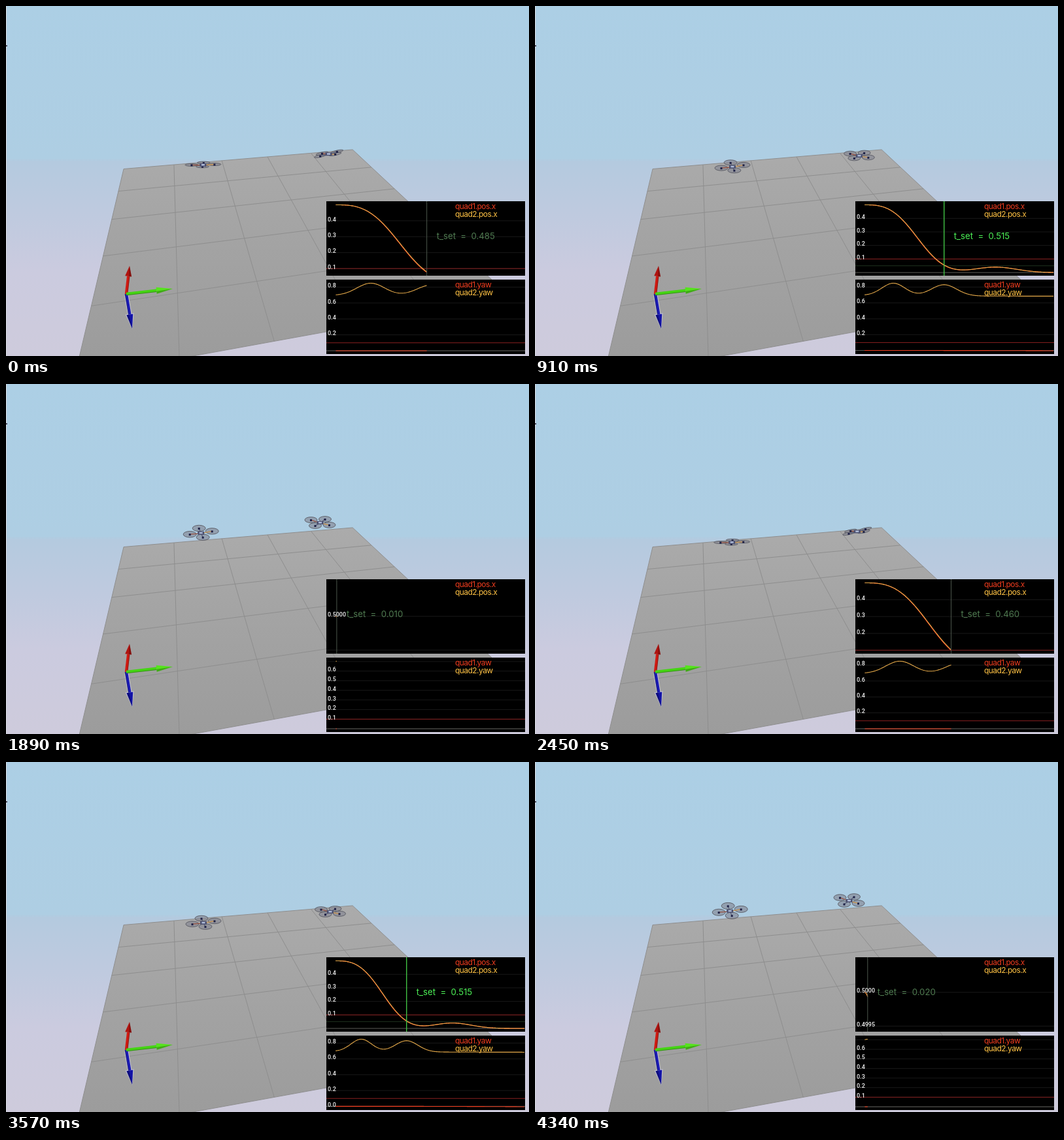
An HTML page with a canvas for the animation above (4.41 s loop, 800 by 536 pixels).

```html
<!DOCTYPE html>
<html lang="en">
<head>
<meta charset="utf-8">
<title>Two quadcopters</title>
<style>
html, body { margin: 0; width: 100%; height: 100%; overflow: hidden; background: #abcfe5; }
canvas { display: block; }
</style>
</head>
<body>
<canvas id="stage" width="800" height="536"></canvas>
<script>
const ctx = document.getElementById('stage').getContext('2d');
const STEP = 70, FRAMES = 63, RATE = .0563, SETTLE = .515;
const RED = '#ee3c1e', AMBER = '#ffc244', TRACE = '#e6aa4a';

const clamp = x => Math.max(0, Math.min(1, x));
const bell = (t, mid, width) => Math.exp(-(((t - mid) / width) ** 2));

// Simulated seconds: joins mid-flight, then restarts twice
function simTime(n) {
  const [first, t0] = n < 27 ? [0, .485] : n < 62 ? [27, .01] : [62, .02];
  return t0 + RATE * (n - first);
}

// Smooth approach to zero with one late rebound
const approach = c => t => .5 * Math.exp(-(t ** 3) / c) + .04 * bell(t, .845, .19);
const pos1 = approach(.06), pos2 = approach(.0615);
const yaw1 = t => -.0021 * t ** 3;
const yaw2 = t => .683 + .012 * Math.exp(-1.5 * t)
  + .157 * bell(t, .19, .105) + .141 * bell(t, .515, .115);

// Visible rotor height follows the acceleration
function tilt(t) {
  const h = .01, a = (pos2(t + h) - 2 * pos2(t) + pos2(t - h)) / (h * h);
  return 4.5 - 2.5 * Math.tanh(a / 3);
}

function line(x0, y0, x1, y1, color, width = 1) {
  ctx.strokeStyle = color;
  ctx.lineWidth = width;
  ctx.beginPath();
  ctx.moveTo(x0, y0);
  ctx.lineTo(x1, y1);
  ctx.stroke();
}

function polygon(points, fill) {
  ctx.fillStyle = fill;
  ctx.beginPath();
  points.forEach(p => ctx.lineTo(...p));
  ctx.closePath();
  ctx.fill();
}

function text(str, x, y, font, color, spacing = 0) {
  ctx.font = font;
  ctx.letterSpacing = spacing + 'px';
  ctx.fillStyle = color;
  ctx.fillText(str, x, y);
}

function gradient(y0, y1, stops) {
  const g = ctx.createLinearGradient(0, y0, 0, y1);
  stops.forEach(([k, c]) => g.addColorStop(k, c));
  return g;
}

// Perspective of the unit floor square
function floorPoint(u, v) {
  const w = 1 + .126 * u - .522 * v;
  return [(180 + 417 * u - 130 * v) / w, (249.5 - 1.8 * u + 22.5 * v) / w];
}

function arrow(dx, dy, head, shaft, tip, halo) {
  const len = Math.hypot(dx, dy), neck = len - head;
  ctx.save();
  ctx.translate(184, 441);
  ctx.rotate(Math.atan2(dy, dx));
  if (halo) {
    line(2, 0, neck, 0, halo, 6.5);
    polygon([[len + 1, 0], [neck - 1, -6.5], [neck - 1, 6.5]], halo);
  }
  line(0, 0, neck, 0, shaft, 4.4);
  line(0, 1.8, neck, 1.8, 'rgba(0,0,0,.3)', 1);
  polygon([[len, 0], [neck, -5], [neck, 5]], tip);
  polygon([[len, 0], [neck, 1], [neck, 5]], 'rgba(0,0,0,.25)');
  ctx.restore();
}

function scene() {
  ctx.fillStyle = gradient(0, 536, [[0, '#accfe5'], [.435, '#aecee3'], [.445, '#b4cadf'],
    [.6, '#bfcadf'], [.76, '#cbcbdf'], [1, '#cecbdc']]);
  ctx.fillRect(0, 0, 800, 536);
  polygon([floorPoint(0, 0), floorPoint(1, 0), floorPoint(1, 1), floorPoint(0, 1)],
    gradient(220, 536, [[0, '#ababab'], [.4, '#a4a4a4'], [1, '#9c9c9c']]));
  for (let i = 0; i <= 5; i++) {
    const k = i / 5;
    line(...floorPoint(k, 0), ...floorPoint(k, 1), '#8e8e8e');
    line(...floorPoint(0, k), ...floorPoint(1, k), '#8e8e8e');
  }
  line(.5, 0, .5, 536, '#d8dbe2');
  ctx.fillStyle = '#445';
  ctx.fillRect(0, 60, 2, 2);
  arrow(9, 53, 22, '#1a1ab4', '#1212a6', 'rgba(215,215,235,.65)');
  arrow(5, -43, 16, '#cf1a12', '#b01410');
  arrow(71, -8, 25, '#45d414', '#55e41c');
}

function drone(cx, cy, p, q, rx, ry, lean) {
  const hubs = [[-p[0], -p[1]], [-q[0], -q[1]], [p[0], p[1]], [q[0], q[1]]];
  const arms = ['#96503f', '#5b6078', '#c8924e', '#5b6078'];
  ctx.save();
  ctx.translate(cx, cy);
  for (const [x, y] of hubs) {
    ctx.beginPath();
    ctx.ellipse(x, y, rx, ry, lean, 0, 2 * Math.PI);
    ctx.fillStyle = 'rgba(130,132,146,.62)';
    ctx.fill();
    ctx.strokeStyle = '#585a62';
    ctx.lineWidth = .9;
    ctx.stroke();
  }
  hubs.forEach(([x, y], i) => {
    line(0, 1, x, y, arms[i], 1.3);
    ctx.fillStyle = '#1e2146';
    ctx.fillRect(x - 1.5, y - 1, 3, 3);
  });
  ctx.fillStyle = '#4b5070';
  ctx.fillRect(-5, -2, 10, 5);
  ctx.fillStyle = '#aebbd8';
  ctx.fillRect(-2.5, -1, 5, 2.5);
  ctx.restore();
}

function drones(t) {
  const s = 1 - pos2(t) / .5, r = tilt(t), m = clamp((4.3 - r) / 2.3);
  drone(480.5 + 15.5 * s, 212 + 17 * s,
    [14 - 4 * m, 1.4 * r - 3 + .7 * m], [-7.5 - 5.5 * m, 1.5 * r - 2.4 + 2.8 * m],
    9.5, r * .9, -.22 * m);
  drone(298.2 + 3.8 * s, 227.8 + 18 * s,
    [17 + .5 * m, -2.4 + 2 * m], [3 - 4 * m, 1.4 * r], 10, r * .95, 0);
}

function tickStep(pxPerUnit) {
  for (let e = -4; ; e++) {
    for (const n of [1, 2, 5]) {
      const step = n * 10 ** e;
      if (step >= .00049 && step * pxPerUnit >= 14) return step;
    }
  }
}

function panel(top, t, series, name, mark) {
  const span = Math.max(1, t), X = s => 503 + s * 290 / span;
  const times = [];
  for (let s = .005; s < t; s += .004) times.push(s);
  times.push(t);

  const values = series.flatMap(f => times.map(f));
  let lo = Math.min(...values), hi = Math.max(...values);
  const pad = Math.max(0, .001 - (hi - lo)) / 2;
  lo -= pad;
  hi += pad;
  const y0 = top + 109, scale = 103.5 / (hi - lo), Y = v => y0 - (v - lo) * scale;
  const level = (v, c) => {
    if (v >= lo - .001 && v <= hi) line(490, Y(v), 794, Y(v), c);
  };

  ctx.save();
  ctx.beginPath();
  ctx.rect(490, top, 304, 114);
  ctx.clip();
  ctx.fillStyle = '#000';
  ctx.fillRect(490, top, 304, 114);

  const step = tickStep(scale), digits = Math.max(1, -Math.floor(Math.log10(step) + 1e-9));
  const ticks = [];
  for (let n = Math.ceil(lo / step - 1e-6); n * step <= hi + 1e-9; n++) ticks.push(n * step);
  ticks.forEach(v => level(v, '#191919'));
  level(0, '#5c5c58');
  if (mark) level(.05, '#1f331f');
  level(.1, '#8a2020');

  name.forEach((str, i) => text(str, 687, top + 11.5 + 12 * i,
    '12px Inter, sans-serif', i ? AMBER : RED, -.55));

  series.forEach((f, i) => {
    ctx.strokeStyle = i ? TRACE : RED;
    ctx.lineWidth = 1.1;
    ctx.beginPath();
    times.forEach(s => ctx.lineTo(X(s), Y(f(s))));
    ctx.stroke();
  });

  if (mark) {
    const set = Math.min(t, SETTLE), x = X(set), done = t >= SETTLE + .5;
    line(x, top, x, top + 114, done ? '#40c044' : '#4c574c', done ? 1.4 : 1);
    text('t_set\u00a0 =\u00a0 ' + (Math.round(set * 200) / 200).toFixed(3), x + 15, top + 58,
      '13.2px Inter, sans-serif', done ? '#4cf056' : '#4f7a50');
  }
  for (const v of ticks) {
    const y = Y(v);
    if (y > top + 9 && y < y0 - .5) {
      text(v.toFixed(digits), 492, y + .7, '500 9px Roboto, sans-serif', '#f4f4f4');
    }
  }
  ctx.restore();
}

function draw() {
  const t = simTime(Math.floor(performance.now() / STEP) % FRAMES);
  scene();
  drones(t);
  panel(299, t, [pos1, pos2], ['quad1.pos.x', 'quad2.pos.x'], true);
  panel(419, t, [yaw1, yaw2], ['quad1.yaw', 'quad2.yaw'], false);
  requestAnimationFrame(draw);
}
draw();
</script>
</body>
</html>
```
